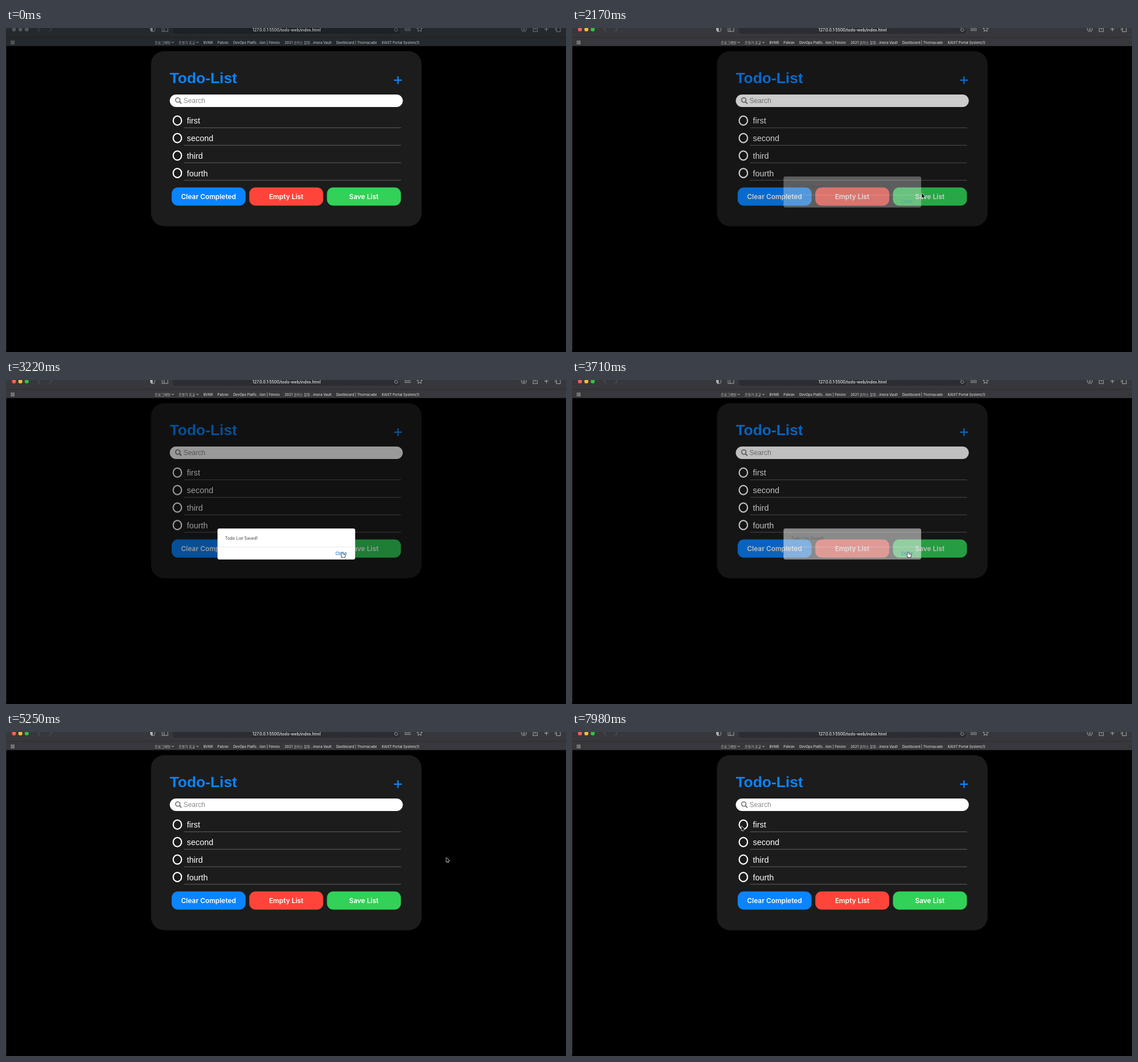
These frames come from a looping animation (983 px wide and 570 px high, 8 s). An HTML page with a canvas:

```html
<!DOCTYPE html>
<html lang="en">
<head>
<meta charset="utf-8">
<title>Todo-List</title>
<style>
html, body { margin: 0; width: 100%; height: 100%; overflow: hidden; background: #000; }
canvas { display: block; width: 983px; height: 570px; }
</style>
</head>
<body>
<canvas id="stage" width="983" height="570"></canvas>
<script>
const g = document.getElementById('stage').getContext('2d');
const LOOP = 8000, STEP = 70;
const UI = 'Inter, "Noto Sans CJK KR", "Noto Sans CJK", sans-serif';
const PAGE = '"Liberation Sans", Arial, sans-serif';
const BLUE = '#0a84ff';
const TAU = Math.PI * 2;

const ramp = (t, from, to) => Math.max(0, Math.min(1, (t - from) / (to - from)));
const within = (t, a, b) => t >= a && t < b;

function box(x, y, w, h, r, fill) {
  g.beginPath();
  g.roundRect(x, y, w, h, r);
  g.fillStyle = fill;
  g.fill();
}

function frame(x, y, w, h, color) {
  g.strokeStyle = color;
  g.lineWidth = 0.9;
  g.strokeRect(x, y, w, h);
}

function text(s, x, y, font, fill, align = 'left') {
  g.font = font;
  g.textAlign = align;
  g.fillStyle = fill;
  g.fillText(s, x, y);
}

function line(points, color, width) {
  g.beginPath();
  points.forEach(([x, y]) => g.lineTo(x, y));
  g.strokeStyle = color;
  g.lineWidth = width;
  g.stroke();
}

function ring(x, y, rx, ry, color, width, from = 0, to = TAU) {
  g.beginPath();
  g.ellipse(x, y, rx, ry, 0, from, to);
  g.strokeStyle = color;
  g.lineWidth = width;
  g.stroke();
}

function plus(x, y, r, color, width) {
  line([[x - r, y], [x + r, y]], color, width);
  line([[x, y - r], [x, y + r]], color, width);
}

// an open "v" of half-size r, pointing at the given angle
function chevron(x, y, r, angle, color) {
  g.save();
  g.translate(x, y);
  g.rotate(angle);
  line([[-r / 2, -r], [r / 2, 0], [-r / 2, r]], color, 1);
  g.restore();
}

function dots(x, y, cols, rows, gap, color) {
  for (let i = 0; i < cols * rows; i++)
    box(x + (i % cols) * gap, y + Math.floor(i / cols) * gap, 1.7, 1.5, 0, color);
}

function star(x, y, r, color) {
  const tips = Array.from({ length: 11 }, (_, i) => {
    const a = i * TAU / 10, d = i % 2 ? r * 0.45 : r;
    return [x + d * Math.sin(a), y - d * Math.cos(a)];
  });
  line(tips, color, 0.9);
}

function shield(x, y, color) {
  box(x - 4, y - 5, 4, 9, [0, 0, 0, 4], color);
  g.beginPath();
  g.roundRect(x - 4, y - 5, 8, 9, [0, 0, 4, 4]);
  g.strokeStyle = color;
  g.lineWidth = 0.9;
  g.stroke();
}

const bookmarks = ['프로그래밍', '프밍기 조교', 'BVNR', 'Palvon', 'DevOps Platfo...tion | Fenrov',
  '2021 코러스 합창...imora Vault', 'Dashboard | Thornacade', 'KAIST Portal System(1)'];

function drawBookmarks(color) {
  let x = 261;
  bookmarks.forEach((name, i) => {
    text(name, x, 27.5, '500 6px ' + UI, color);
    x += g.measureText(name).width;
    if (i < 2) {
      x += 4;
      chevron(x, 25.3, 1.9, TAU / 4, color);
      x += 2;
    }
    x += 8.3;
  });
}

function drawToolbar(active) {
  const icon = active ? '#b4b4b7' : '#7d8185';
  const faint = active ? '#606065' : '#505458';
  const seam = active ? '#2c2c30' : '#1c2023';
  box(0, 0, 983, 32, 0, active ? '#38383c' : '#25292c');
  box(0, 16, 983, 1, 0, seam);
  box(0, 31, 983, 1, 0, seam);
  box(293, -10, 398, 20, 3, active ? '#2d2d31' : '#1d2124');

  ['#ff5f57', '#febc2e', '#28c840'].forEach((c, i) =>
    box(10.5 + i * 11.2, -1, 7, 7, 3.5, active ? c : '#53575b'));
  chevron(58, 2.5, 4, TAU / 2, faint);
  chevron(78, 2.5, 4, 0, faint);
  shield(257.5, 2.5, icon);
  frame(274, -2, 10, 8, icon);
  line([[277.5, -2], [277.5, 6]], icon, 0.9);

  text('127.0.0.1:5500/todo-web/index.html', 492.5, 5.5, '500 7px ' + UI,
    active ? '#eeeeef' : '#d5d7d8', 'center');
  ring(685, 3, 2.8, 2.8, icon, 0.9, -0.6, 4.6);
  chevron(685.5, 0.2, 1.4, 0, icon);
  dots(700, 0.8, 4, 2, 2.8, icon);
  star(726, 2, 5, icon);

  ring(909, 2, 4.4, 4.4, icon, 0.9);
  line([[909, -1], [909, 4]], icon, 0.9);
  chevron(909, 3.3, 2, TAU / 4, icon);
  frame(925.3, 0, 7.4, 6.3, icon);
  line([[929, -3], [929, 3.4]], icon, 0.9);
  plus(948.5, 2, 3.6, icon, 1);
  frame(966.5, -1.5, 6.5, 8, icon);
  line([[964.3, -3], [964.3, 4.5]], icon, 0.9);

  dots(8.5, 22.5, 3, 3, 2.3, icon);
  drawBookmarks(active ? '#d2d2d4' : '#b5b8ba');
}

function drawPage() {
  box(254.5, 40.7, 475, 308, 23, '#1c1c1d');
  text('Todo-List', 287.4, 97.2, 'bold 26.4px ' + PAGE, BLUE);
  plus(688, 91.8, 6.8, BLUE, 2.4);

  box(287.5, 117, 409, 22, 11, '#fff');
  ring(301.6, 126.8, 3.9, 3.9, '#858585', 1.9);
  line([[304.3, 129.6], [308, 133.2]], '#858585', 2.2);
  text('Search', 311.5, 131.9, '12.1px ' + PAGE, '#8c8c8c');

  ['first', 'second', 'third', 'fourth'].forEach((s, i) => {
    const y = 162.9 + i * 30.75;
    ring(300.8, y, 7.3, 8, '#fff', 2.2);
    text(s, 317.5, y + 5.5, '14.4px ' + PAGE, '#fff');
    line([[312.5, y + 12.7], [693.3, y + 12.7]], '#626262', 1);
  });

  [['Clear Completed', BLUE], ['Empty List', '#ff453a'], ['Save List', '#32d158']].forEach(([s, c], i) => {
    const x = 290.8 + i * 136.3;
    box(x, 280.6, 129.8, 31.8, 11, c);
    text(s, x + 64.7, 300.8, '600 11.9px ' + UI, '#fff', 'center');
  });
}

function drawDialog(alpha) {
  g.save();
  g.globalAlpha = alpha;
  box(371.3, 261.3, 241.6, 54.4, 3, '#fff');
  box(371.3, 293.4, 241.6, 0.9, 0, '#dedee0');
  text('Todo List Saved!', 384.6, 281, '7.3px ' + UI, '#434345');
  text('Close', 578.2, 307.8, '500 7.4px ' + UI, '#0a72d8');
  g.restore();
}

// pointer moves: from time, to time, end point
const moves = [
  [210, 560, 572, 372],
  [630, 910, 614, 291],
  [2660, 3220, 589.5, 303],
  [3990, 4270, 773, 221],
  [5390, 5600, 719, -10],
  [5810, 6300, 685, 4],
  [7140, 7420, 531, 117],
  [7560, 7980, 297.5, 165.5]
];
const clicks = [1470, 3570, 6580];

function pointerAt(t) {
  let x = 484, y = 590;
  for (const [from, to, endX, endY] of moves) {
    const k = ramp(t, from, to);
    x += (endX - x) * k;
    y += (endY - y) * k;
  }
  return [x, y];
}

function drawArrow(x, y) {
  line([[x + 2, y + 5], [x + 3.6, y + 8.8]], '#fff', 2.6);
  line([[x, y], [x, y + 7.6], [x + 5.3, y + 5.5], [x, y]], '#fff', 1.3);
  g.fillStyle = '#000';
  g.fill();
  line([[x + 2, y + 5], [x + 3.5, y + 8.5]], '#000', 1.2);
}

function drawHand(x, y) {
  for (const [grow, color] of [[0.6, '#111'], [0, '#fff']]) {
    box(x - grow, y - grow, 1.9 + 2 * grow, 6 + 2 * grow, 1, color);
    box(x - 1 - grow, y + 3.6 - grow, 6.6 + 2 * grow, 5.2 + 2 * grow, 2, color);
  }
}

function drawClick(x, y) {
  ring(x, y, 16.5, 16.5, 'rgba(20,20,20,0.65)', 2.8);
  ring(x, y, 16.5, 16.5, '#e6e6e6', 1.1);
}

function draw(time) {
  const t = Math.floor(time / STEP) * STEP;
  box(0, 0, 983, 570, 0, '#000');
  drawPage();

  const dim = ramp(t, 2100, 2240) - ramp(t, 3640, 3830);
  const dialog = ramp(t, 2100, 2330) - ramp(t, 3640, 3780);
  box(0, 32, 983, 538, 0, `rgba(0,0,0,${0.4 * dim})`);
  drawDialog(dialog);

  drawToolbar(t >= 1540);
  box(0, 32, 1, 535, 0, '#242426');

  const [x, y] = pointerAt(t);
  const hand = within(t, 1470, 2170) || within(t, 3080, 4060);
  (hand ? drawHand : drawArrow)(x, y);
  if (clicks.some(c => within(t, c, c + 140))) drawClick(x, y);
}

const start = performance.now();
function tick() {
  draw((performance.now() - start) % LOOP);
  requestAnimationFrame(tick);
}
tick();
</script>
</body>
</html>
```
